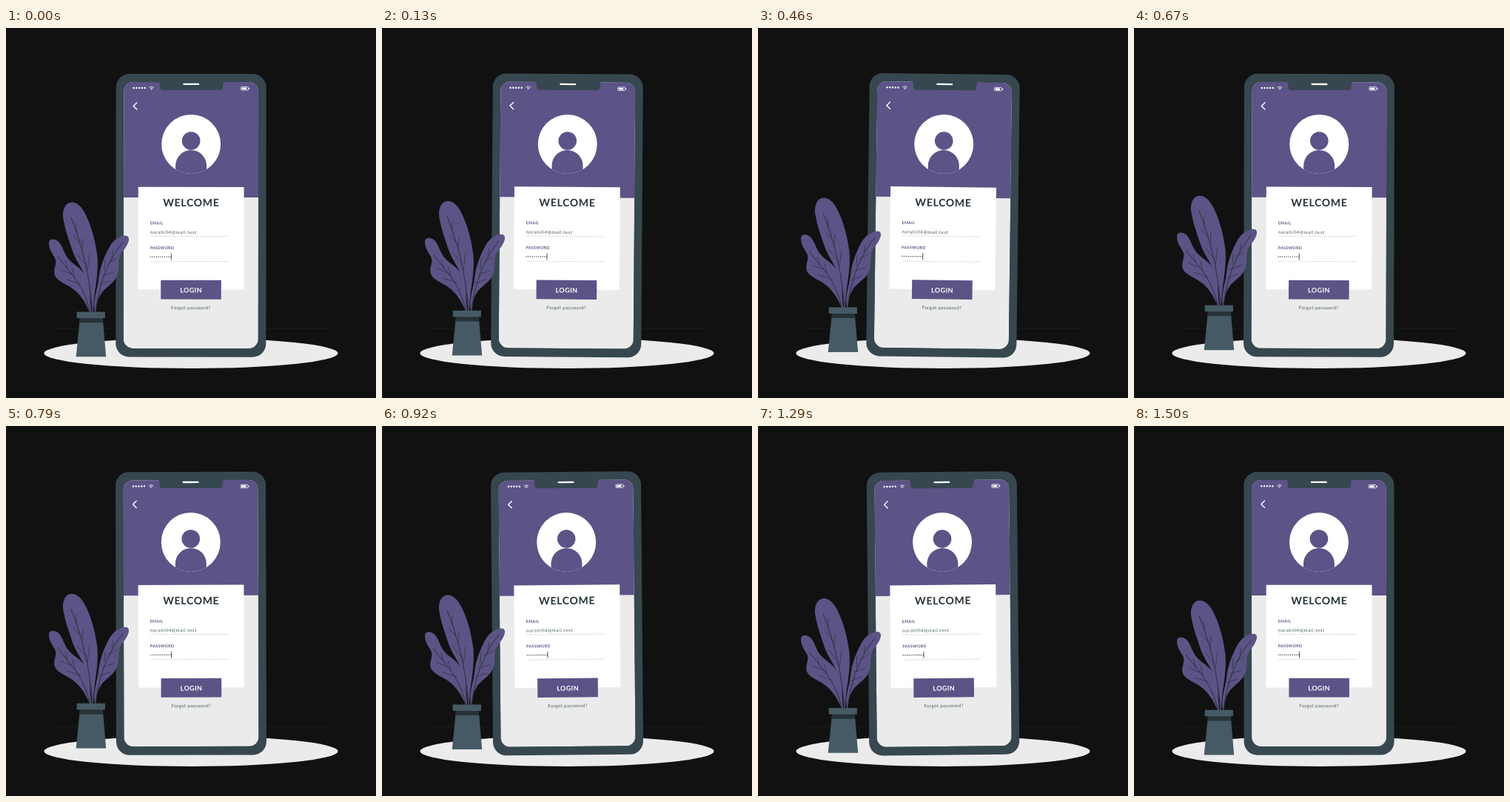
Animation of 500x500 px, one loop 1540 ms. Source, as an HTML page:

```html
<!DOCTYPE html>
<html lang="en">
<head>
<meta charset="utf-8">
<title>Login screen</title>
<style>
  html, body { margin: 0; height: 100%; overflow: hidden; background: #111; }
  svg { display: block; width: 100%; height: 100%; }
  text { font-family: Lato, sans-serif; }
  .purple { fill: #5c5387; }
  .label { font-size: 5.4px; font-weight: 700; letter-spacing: .3px; }
  .small { font-size: 6.2px; fill: #455a64; }
  .vein { fill: none; stroke: #263238; stroke-width: 1; stroke-linecap: round; }
  .thin { stroke-width: .7; }
</style>
</head>
<body>
<svg viewBox="0 0 500 500">
  <defs>
    <clipPath id="screen"><rect x="159" y="73" width="182" height="360" rx="13"/></clipPath>
    <clipPath id="avatar"><circle cx="250" cy="157" r="40"/></clipPath>
  </defs>

  <path d="M66 406.4H440" stroke="#263238" stroke-width=".5" opacity=".7"/>
  <ellipse cx="250" cy="439.5" rx="198.5" ry="20.5" fill="#ebebeb"/>

  <g id="phone">
    <rect x="148.5" y="62" width="203" height="382.6" rx="18" fill="#37474f"/>
    <g clip-path="url(#screen)">
      <rect x="159" y="73" width="182" height="360" fill="#ebebeb"/>
      <rect class="purple" x="159" y="73" width="182" height="156"/>
    </g>
    <path d="M206 72.5Q208 74 208 78V80Q208 84 212 84H289Q293 84 293 80V78Q293 74 295 72.5Z" fill="#37474f"/>
    <rect x="239" y="74.8" width="22" height="2.3" rx="1.1" fill="#fff"/>

    <path d="M172.4 81.2H188" stroke="#fff" stroke-width="2.5" stroke-linecap="round" stroke-dasharray="0 3.75"/>
    <g fill="none" stroke="#fff">
      <path d="M193.3 80.6Q196.5 78 199.7 80.6M194.7 82Q196.5 80.6 198.3 82" stroke-width=".8"/>
      <path d="M176.6 101L172 105.6L176.6 110.2" stroke-width="1.4" stroke-linecap="round" stroke-linejoin="round"/>
      <rect x="317.4" y="79.5" width="10" height="4.4" rx="1" stroke-width=".8"/>
    </g>
    <circle cx="196.5" cy="83" r=".7" fill="#fff"/>
    <path d="M318.5 80.5H325V83H318.5ZM328 80.8H329V82.7H328Z" fill="#fff"/>

    <circle cx="250" cy="157" r="40" fill="#fff"/>
    <circle class="purple" cx="250" cy="152.5" r="12.3"/>
    <rect class="purple" x="229" y="165" width="42" height="50" rx="21" clip-path="url(#avatar)"/>

    <rect x="178.7" y="214.8" width="142.8" height="138.6" fill="#fff"/>
    <text x="250.3" y="241" text-anchor="middle" font-size="14" font-weight="700" letter-spacing=".7" fill="#263238">WELCOME</text>
    <text class="label purple" x="194.7" y="265.6">EMAIL</text>
    <text class="small" x="194.7" y="278.2" letter-spacing=".6">norahill4@mail.test</text>
    <text class="label purple" x="194.7" y="299.1">PASSWORD</text>
    <path d="M195.7 309.2H222.8" stroke="#263238" stroke-width="1.4" stroke-linecap="round" stroke-dasharray="0 2.68"/>
    <path d="M223.4 304.5V313.5" stroke="#263238" stroke-width=".8"/>
    <path d="M195 281.5H301M195 315.5H301" stroke="#c7c7c7" stroke-width=".5"/>

    <rect class="purple" x="209.3" y="340.8" width="81.6" height="25.8"/>
    <text x="250.2" y="357.6" text-anchor="middle" font-size="9" font-weight="700" letter-spacing=".4" fill="#fff">LOGIN</text>
    <text class="small" x="250" y="380.2" text-anchor="middle" letter-spacing=".35">Forgot password?</text>
  </g>

  <g id="plant">
    <g class="purple">
      <path d="M113 384C104 363 94 354 82 347.5C72 342 64 338 65.3 328C66 322 69 317 66 311C62 304 58 299 58 291C58 285 65 284 71 289C77 295 78 305 85 313C93 322 104 325 110 340C114 351 113 367 115 384Z"/>
      <path d="M120 384C117 368 124 352 125 340C127 323 133 308 141 294C147 285 158 279 164 281.5C169 285 164 295 157 303C150 311 154 320 151 332C147 346 134 350 128 360C123 368 122 376 122 384Z"/>
      <path d="M116 384C115 366 113 351 107 335C101 322 93 312 89 299C85 286 80 274 78 261C75 248 79 237 88 236C98 235 106 247 111 260C117 274 121 290 123.5 309C125 325 122 345 120 358C119 367 118 376 118 384Z"/>
    </g>
    <g class="vein">
      <path d="M88 257C98 282 112 322 117 384M70 309C85 330 105 345 113 384M158 290C143 307 126 340 121 384"/>
      <path class="thin" d="M95 276L94.5 264M103 301L104 285M110 328L113 306M100 292L91 281M108 321L96 306M83 326L80 315M93 338L90 325M89 333L74 327M100 346L82 340M143 310L145 300M133 328L134 314M138 318L149 312M130 335L146 330M126 347L140 342"/>
    </g>
    <path d="M100 392H130.7L135.2 444.6H94.7Z" fill="#455a64"/>
    <path d="M100 392H130.7L131.2 398.6H99.4Z" fill="#263238"/>
    <rect x="95.7" y="383.9" width="38.2" height="8.6" fill="#455a64"/>
  </g>
</svg>
<script>
  const LOOP = 1540;
  const phone = document.getElementById('phone');
  const plant = document.getElementById('plant');

  // [time in ms, value] pairs, joined by straight lines
  const tilt = [[-25, 0], [350, 1], [1115, -1], [1515, 0], [1890, 1]];
  const lift = [[-25, 0], [725, -10], [1515, 0], [2265, -10]];

  function valueAt(keys, t) {
    const i = keys.findIndex(key => key[0] > t);
    const [t0, v0] = keys[i - 1], [t1, v1] = keys[i];
    return v0 + (v1 - v0) * (t - t0) / (t1 - t0);
  }

  function draw() {
    const t = performance.now() % LOOP;
    phone.setAttribute('transform', `rotate(${valueAt(tilt, t)} 250 253)`);
    plant.setAttribute('transform', `translate(0 ${valueAt(lift, t)})`);
    requestAnimationFrame(draw);
  }
  draw();
</script>
</body>
</html>
```
